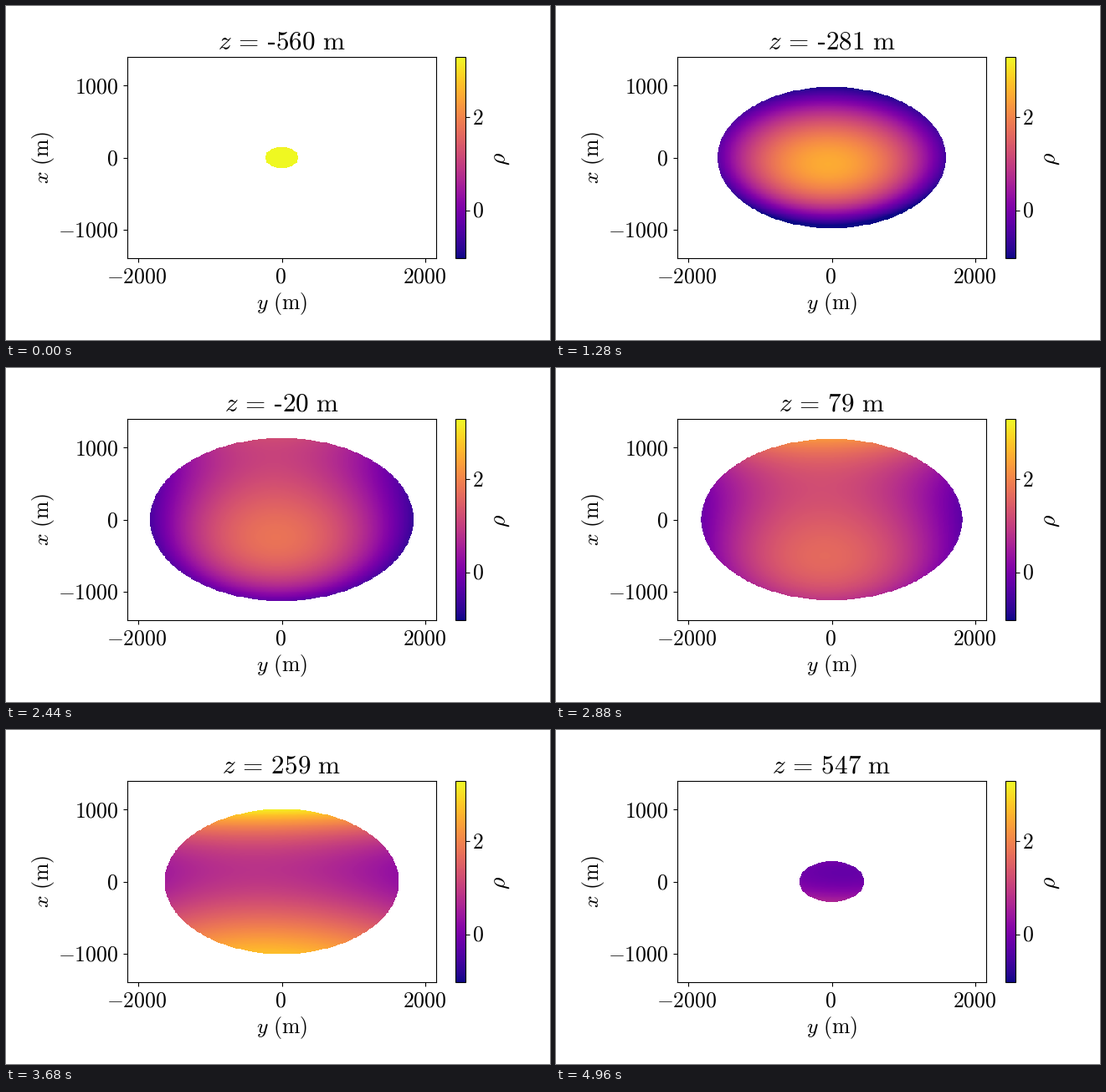
Animation of 650x400 px, one loop 5 s. Source, as a matplotlib script:

```python
import numpy as np
import matplotlib.pyplot as plt
from matplotlib.animation import FuncAnimation
from matplotlib.lines import Line2D

W, H, DPI = 650, 400, 100
FRAMES, INTERVAL = 125, 40
LABEL, TITLE = 18.5, 22.5           # font sizes in points
TITLE_EM = TITLE * DPI / 72         # title em in pixels
SEMI_X, SEMI_Y, SEMI_Z = 1134, 1834, 564.5
Y_LIM, X_LIM, CELL = 2150, 1400, 10
RHO_MIN, RHO_MAX = -1.03, 3.29

plt.rcParams["mathtext.fontset"] = "cm"
fig = plt.figure(figsize=(W / DPI, H / DPI), dpi=DPI, facecolor="white")


def add_axes(left, top, right, bottom):
    return fig.add_axes([left / W, 1 - bottom / H,
                         (right - left) / W, (bottom - top) / H])


def put(x, y, text, size=LABEL, ha="center", rotation=0):
    return fig.text(x / W, 1 - y / H, text, size=size, ha=ha, va="baseline",
                    rotation=rotation, rotation_mode="anchor")


def cell_centres(limit):
    return np.arange(-limit + CELL / 2, limit, CELL)


Y, X = np.meshgrid(cell_centres(Y_LIM) / SEMI_Y, cell_centres(X_LIM) / SEMI_X)


def density(z):
    """Polynomial density on one slice of the ellipsoid, NaN outside."""
    Z = z / SEMI_Z
    level = 0.615 - 0.37 * Z - 0.05 * Z**3
    level = level + (1.82 * Z - 0.22) * X**2 + (0.8 * Z - 0.5) * Y**2
    level += -(0.17 + 0.1 * Z**2 + 0.1 * Z**3) * X + 0.34 * X**3
    level += -0.05 * Y + 0.03 * Y**3 + (0.2 - 0.3 * Z) * X * Y**2
    rho = RHO_MIN + (RHO_MAX - RHO_MIN) * np.clip(level, 0, 1)
    return np.where(X**2 + Y**2 + Z**2 <= 1, rho, np.nan)


def height(frame):
    return -560 + 9 * max(0, frame - 1)


ax = add_axes(145, 61, 514, 302)
image = ax.imshow(density(height(0)), cmap="plasma", vmin=RHO_MIN, vmax=RHO_MAX,
                  origin="lower", interpolation="nearest", aspect="auto",
                  extent=(-Y_LIM, Y_LIM, -X_LIM, X_LIM))
ax.set_xticks([-2000, 0, 2000], labels=[])
ax.set_yticks([-1000, 0, 1000], labels=[])

bar = fig.colorbar(image, cax=add_axes(537, 61, 549, 302))
bar.set_ticks([0, 2], labels=["", ""])

for x, value in ((156.5, -2000), (328, 0), (500.5, 2000)):
    put(x, 331, f"${value}$")
for y, value in ((104.5, 1000), (190.5, 0), (276.5, -1000)):
    put(134, y, f"${value}$", ha="right")
for y, value in ((141.5, 2), (253, 0)):
    put(557, y, f"${value}$", ha="left")
put(329, 363.5, r"$y\ \mathrm{(m)}$")
put(51.5, 181.5, r"$x\ \mathrm{(m)}$", rotation=90)
put(597, 182.5, r"$\rho$", size=20, rotation=90)

title = put(329.5, 51.5, "", size=TITLE)
# Mathtext turns "-" into a wide minus, so the hyphen is a short stroke.
hyphen = Line2D([], [], color="black", lw=1.6, solid_capstyle="butt",
                transform=fig.transFigure)
fig.add_artist(hyphen)


def update(frame):
    z = height(frame)
    image.set_data(np.ma.masked_invalid(density(z)))
    digits = str(abs(z))
    gap = r"\hspace{0.38}" if z < 0 else ""
    title.set_text(rf"$z\,=\,{gap}{digits}\ \mathrm{{m}}$")
    centre = 329.5 + TITLE_EM * (0.25 * (3 - len(digits)) - 0.392)
    half = 0.135 * TITLE_EM
    hyphen.set_data([(centre - half) / W, (centre + half) / W],
                    [1 - 44.5 / H] * 2)
    hyphen.set_visible(z < 0)
    return image, title, hyphen


anim = FuncAnimation(fig, update, frames=FRAMES, interval=INTERVAL,
                     repeat=True, repeat_delay=0, blit=False)
plt.show()
```
